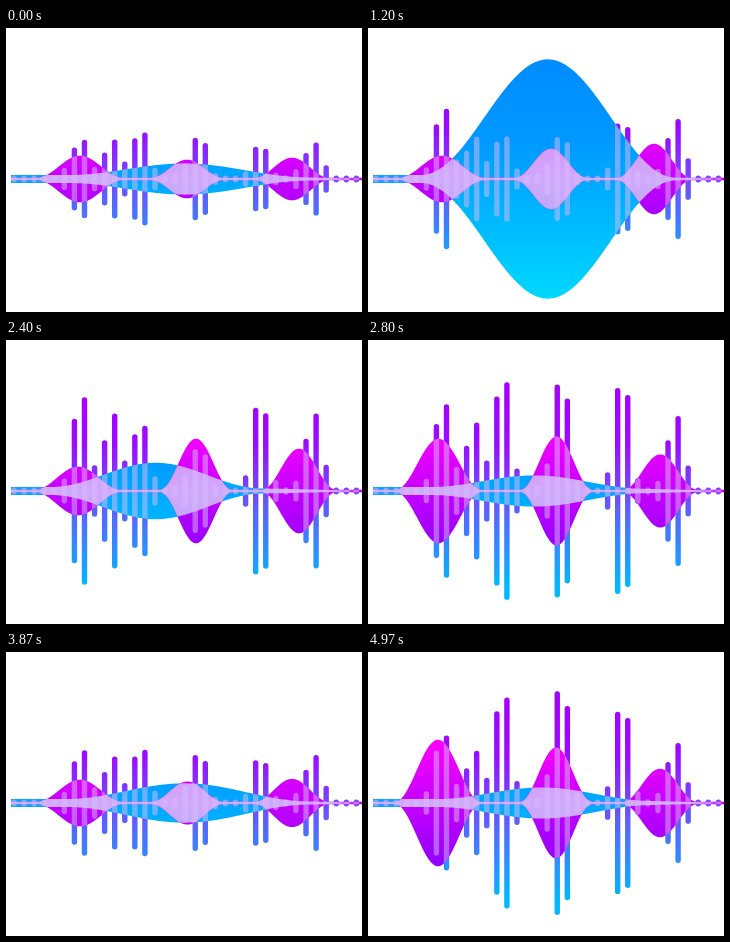
Recreate the animation shown at these times as an HTML page with a canvas. Size 356 px wide and 284 px high, loop 5.07 s.

```html
<!DOCTYPE html>
<html lang="en">
<head>
<meta charset="utf-8">
<title>Sound wave</title>
<style>
  html, body { margin: 0; width: 100%; height: 100%; overflow: hidden; background: #fff; }
  canvas { display: block; }
</style>
</head>
<body>
<canvas id="stage" width="356" height="284"></canvas>
<script>
const W = 356, H = 284, MID = 151, LEFT = 5;
const LOOP = 5070;
const BARS = 35, GAP = 10.07, BAR_W = 5.4;
const POSES = [0, 5, 12, 15, 25]; // in ticks of 80 ms; the last repeats the first
const ctx = document.getElementById('stage').getContext('2d');

// Each property holds one value per pose.
const blue = { x: [180, 150, 175, 180], w: [118, 105, 106, 127] };
const lobes = [
  { w: 43, x: [74, 72, 70, 74], h: [22, 23, 62, 22] },
  { w: 36, x: [181, 190, 188, 183], h: [18, 51, 54, 29] },
  { w: 37, x: [286, 293, 292, 286], h: [20, 41, 33, 34] }
];
// Groups of loud bars around a bar index.
const bands = [
  { i: 6.7, h: [38, 96, 68, 71] },
  { i: 9.8, h: [37, 76, 50, 40] },
  { i: 12.6, h: [48, 69, 114, 44] },
  { i: 18.4, h: [42, 43, 121, 43] },
  { i: 24.45, h: [33, 92, 101, 60] },
  { i: 29.8, h: [34, 76, 58, 58] }
];

function pose(values, tick, swell = 0) {
  let i = 0;
  while (tick >= POSES[i + 1]) i++;
  const span = POSES[i + 1] - POSES[i];
  const u = (tick - POSES[i]) / span;
  const a = values[i], b = values[(i + 1) % values.length];
  return (a + (b - a) * u) * (1 + swell * span * Math.sin(Math.PI * u));
}

function bump(x, center, width) {
  const d = (x - center) / width;
  return Math.abs(d) < 1 ? Math.cos(d * Math.PI / 2) ** 2 : 0;
}

// Jumps to its peak on the beat, then eases out.
function beat(tick, start, peak, length) {
  const u = (tick - start) / length;
  return u < 0 || u > 1 ? 0 : peak * (1 - u) ** 2;
}

function barHeight(i, tick) {
  const ripple = Math.max(0, Math.cos((i - 5.2) / 11.5 * 2 * Math.PI)) ** 16;
  return bands.reduce(
    (sum, b) => sum + pose(b.h, tick, .03) * bump(i, b.i, 1.9),
    3.5 + 7 * ripple
  );
}

function ramp(y0, y1, ...colors) {
  const g = ctx.createLinearGradient(0, y0, 0, y1);
  colors.forEach((c, i) => g.addColorStop(i / (colors.length - 1), c));
  return g;
}
const BAR = ramp(55, 245, '#a400ff', '#9a0cff', '#7548fa', '#3c80ff', '#00b8ff');
const BLUE = ramp(32, 270, '#008cff', '#0098ff', '#00b8ff', '#00d8ff');
const PINK = ramp(90, 212, '#fa00ff', '#9200ff');
const BLEND = ramp(100, 205, '#d98fff', '#d0a9fb', '#b4a6fb');
const VEIL = 'rgba(215,188,255,.5)';

function mirror(height) {
  const path = new Path2D();
  path.moveTo(LEFT, MID);
  for (let x = LEFT; x <= W; x++) path.lineTo(x, MID - height(x));
  for (let x = W; x >= LEFT; x--) path.lineTo(x, MID + height(x));
  path.closePath();
  return path;
}

function fill(path, style) {
  ctx.fillStyle = style;
  ctx.fill(path);
}

function clipped(path, paint) {
  ctx.save();
  ctx.clip(path);
  paint();
  ctx.restore();
}

function draw(tick) {
  const bx = pose(blue.x, tick), bw = pose(blue.w, tick);
  const bh = 12 + beat(tick, 1, 130, 5.8) + beat(tick, 13, 150, 12);
  const bluePath = mirror(x => 4 * (1 - (x / W) ** 3) + bh * bump(x, bx, bw));

  const parts = lobes.map(l => [pose(l.x, tick), l.w, pose(l.h, tick)]);
  const pinkPath = mirror(x => parts.reduce((s, [c, w, h]) => s + h * bump(x, c, w), 1.3));

  const barPath = new Path2D();
  for (let i = 0; i < BARS; i++) {
    const x = 8 + i * GAP;
    const len = barHeight(i, tick) - BAR_W / 2;
    barPath.moveTo(x, MID - len);
    barPath.lineTo(x, MID + len);
  }
  const stroke = style => {
    ctx.strokeStyle = style;
    ctx.stroke(barPath);
  };

  ctx.fillStyle = '#fff';
  ctx.fillRect(0, 0, W, H);
  ctx.lineWidth = BAR_W;
  ctx.lineCap = 'round';
  stroke(BAR);
  fill(bluePath, BLUE);
  fill(pinkPath, PINK);
  clipped(bluePath, () => fill(pinkPath, BLEND));

  const waves = new Path2D(bluePath);
  waves.addPath(pinkPath);
  clipped(waves, () => stroke(VEIL));
}

const start = performance.now();
function play() {
  const t = (performance.now() - start) % LOOP;
  const n = Math.floor(t * .03 + .2); // 30 per second, held to 12.5
  draw(Math.floor(n * 5 / 12) % POSES.at(-1));
  requestAnimationFrame(play);
}
play();
</script>
</body>
</html>
```
